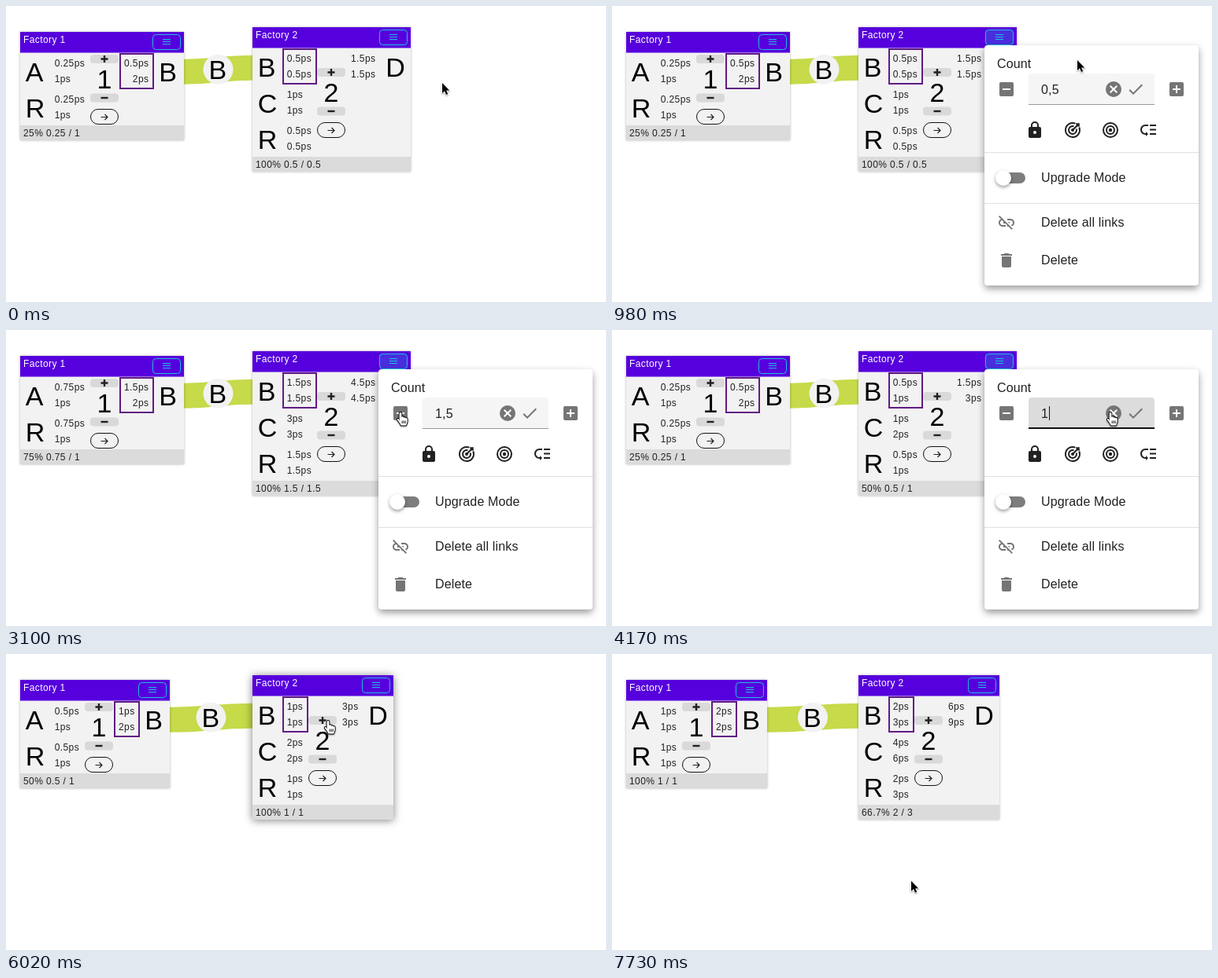
Write an HTML page with a canvas that moves like this. It is 762x377 px and loops after 7.97 s.

```html
<!DOCTYPE html>
<html lang="en">
<head>
<meta charset="utf-8">
<title>Factory planner</title>
<style>
html, body { margin: 0; width: 100%; height: 100%; overflow: hidden; background: #fff; }
canvas { display: block; }
</style>
</head>
<body>
<canvas id="stage" width="762" height="377"></canvas>
<script>
const ctx = document.getElementById('stage').getContext('2d');
const LOOP = 7970, STEP = 80;
const FONT = '"Liberation Sans", Arial, sans-serif';
const GREY = '#757575', INK = '#212121';

// Time, wanted count of factory 2, rate supplied by factory 1
const rates = [
  [0, .5, .5], [1870, 1.5, .5], [2120, 1.5, 1.5], [3360, .5, 1.5], [3600, .5, .5],
  [4170, 1, .5], [4330, 1, 1], [6190, 2, 1], [6430, 2, 2], [7010, 3, 2]
];

// Pointer moves: start, end, x, y, hand shown on arrival
const moves = [
  [0, 0, 554, 98, 0], [90, 330, 491, 40, 1], [820, 980, 591, 69, 0], [1060, 1300, 636, 118, 0],
  [1380, 1460, 672, 202, 0], [1540, 1620, 719, 109, 1], [2460, 3100, 501, 105, 1],
  [3440, 3520, 580, 214, 0], [3600, 3680, 633, 105, 1], [4410, 5050, 407, 242, 0],
  [5460, 5940, 409, 85, 1], [7490, 7730, 380, 289, 0]
];

const icons = {
  lock: 'M12 17a2 2 0 0 0 0-4 2 2 0 0 0 0 4m6-9a2 2 0 0 1 2 2v10a2 2 0 0 1-2 2H6a2 2 0 0 1-2-2V10a2 2 0 0 1 2-2h1V6a5 5 0 0 1 10 0v2h1m-6-5a3 3 0 0 0-3 3v2h6V6a3 3 0 0 0-3-3z',
  order: 'M14 5h8v2h-8zm0 5.5h8v2h-8zm0 5.5h8v2h-8zM2 11.5C2 15.08 4.92 18 8.5 18H9v2l3-3-3-3v2h-.5C6.02 16 4 13.98 4 11.5S6.02 7 8.5 7H12V5H8.5C4.92 5 2 7.92 2 11.5z',
  check: 'M21 7 9 19l-5.5-5.5 1.41-1.41L9 16.17 19.59 5.59z',
  unlink: 'M17 7h-4v1.9h4c1.71 0 3.1 1.39 3.1 3.1 0 1.43-.98 2.63-2.31 2.98l1.46 1.46C20.88 15.61 22 13.95 22 12c0-2.76-2.24-5-5-5zm-1 4h-2.19l2 2H16zM2 4.27l3.11 3.11A5 5 0 0 0 2 12c0 2.76 2.24 5 5 5h4v-1.9H7c-1.71 0-3.1-1.39-3.1-3.1 0-1.59 1.21-2.9 2.76-3.07L8.73 11H8v2h2.73L13 15.27V17h1.73l4.01 4L20 19.74 3.27 3z',
  trash: 'M19 4h-3.5l-1-1h-5l-1 1H5v2h14zM6 19a2 2 0 0 0 2 2h8a2 2 0 0 0 2-2V7H6z'
};
const arrowPath = new Path2D('M0 0V13L3 10.3 5 15 7.2 14 5.2 9.4H9.2Z');
const handPath = new Path2D('M-1.4 11V1.4a1.4 1.4 0 0 1 2.8 0V6.5a1.3 1.3 0 0 1 2.6 0V7a1.3 1.3 0 0 1 2.5.2V8a1.1 1.1 0 0 1 2.2.2V11.5c0 2-1.2 3-1.4 5H.6c-.5-2-3-4.5-4.6-7-.8-1.4.9-2.2 1.8-1z');

const clamp = v => Math.max(0, Math.min(1, v));
const last = (list, t) => list.reduce((found, row, i) => row[0] <= t ? i : found, 0);
const ps = v => +v.toFixed(2) + 'ps';

function setFont(size, spacing) {
  ctx.font = `${size}px ${FONT}`;
  ctx.letterSpacing = spacing + 'px';
}
function text(s, x, y, size, color = INK, align = 'left') {
  setFont(size, { 12: .4, 16: .15, 34: .25 }[size]);
  ctx.fillStyle = color;
  ctx.textAlign = align;
  ctx.fillText(s, x, y);
}
function rect(x, y, w, h, color, r = 0) {
  ctx.fillStyle = color;
  ctx.beginPath();
  ctx.roundRect(x, y, w, h, r);
  ctx.fill();
}
function outline(x, y, w, h, color, width, r = 0) {
  ctx.strokeStyle = color;
  ctx.lineWidth = width;
  ctx.beginPath();
  ctx.roundRect(x, y, w, h, r);
  ctx.stroke();
}
function dot(x, y, r, color) {
  rect(x - r, y - r, 2 * r, 2 * r, color, r);
}
function stroke(d, x, y, color, width) {
  ctx.save();
  ctx.translate(x, y);
  ctx.strokeStyle = color;
  ctx.lineWidth = width;
  ctx.stroke(new Path2D(d));
  ctx.restore();
}
function icon(name, x, y, color) {
  ctx.save();
  ctx.translate(x - 12, y - 12);
  ctx.fillStyle = color;
  ctx.fill(new Path2D(icons[name]), 'evenodd');
  ctx.restore();
}
function shadow(blur, dy, alpha, draw) {
  ctx.save();
  ctx.shadowColor = `rgba(0,0,0,${alpha})`;
  ctx.shadowBlur = blur;
  ctx.shadowOffsetY = dy;
  draw();
  ctx.restore();
}

// Column positions follow from the widest rate in each column
function layout(card) {
  setFont(12, .4);
  const widest = rows => Math.max(...rows.flatMap(r => [r[1], r[2]]).map(v => ctx.measureText(ps(v)).width));
  card.rateX = card.x + 43.7;
  card.inW = widest(card.inputs);
  card.midX = Math.round(card.rateX + card.inW + 7);
  card.outW = widest([card.output]);
  card.outX = card.midX + 43;
  card.w = Math.round(card.outX + card.outW + 44.5) - card.x;
  return card;
}

function drawCard(c) {
  const { x, y, w, midX } = c;
  const rows = c.inputs.length, foot = y + 27 + rows * 46, mid = y + 27 + rows * 23;
  shadow(c.hover ? 10 : 3, c.hover ? 1 : 0, c.hover ? .5 : .3, () => rect(x, y, w, foot + 19 - y, '#f2f2f2'));
  rect(x, y, w, 26.5, '#5600dd');
  rect(x, foot, w, 19, '#dbdbdb');
  text(c.title, x + 4, y + 14, 12, '#fff');
  if (c.active) rect(x + w - 40, y + 3, 36, 20, 'rgba(30,190,225,.24)', 4);
  outline(x + w - 39.5, y + 3.5, 35, 19, '#1cbfe0', 1, 4);
  stroke('M-5-3.5H5M-5-.5H5M-5 2.5H5', x + w - 22, y + 13, '#1cbfe0', 1);

  c.inputs.forEach(([name, now, max], i) => {
    const top = y + 27 + i * 46;
    text(name, x + 6.8, top + 36, 34, '#000');
    text(ps(now), c.rateX, top + 17, 12);
    text(ps(max), c.rateX, top + 37, 12);
  });

  for (const dy of [-38.5, 11]) rect(midX, mid + dy - 5.5, 36, 11, '#d9d9d9', 4);
  stroke('M-4.5 0H4.5M0-4.5V4.5', midX + 18, mid - 38.5, INK, 2.4);
  stroke('M-4.5 0H4.5', midX + 18, mid + 11, INK, 2.4);
  text(c.id, midX + 18, mid - 1, 34, '#000', 'center');
  outline(midX + .5, mid + 25.5, 35, 19, '#111', 1, 9.5);
  stroke('M-4.5 0H4M.5-3.5 4 0 .5 3.5', midX + 18, mid + 35.5, INK, 1.2);

  const [name, now, max] = c.output, right = c.outX + c.outW;
  text(ps(now), right, y + 44, 12, INK, 'right');
  text(ps(max), right, y + 64, 12, INK, 'right');
  text(name, right + 12.8, y + 63, 34, '#000');
  const [boxX, boxW] = c.boxed === 'out' ? [c.outX - 6, c.outW + 12] : [c.rateX - 6, c.inW + 12];
  outline(Math.round(boxX) + 1, y + 28, Math.ceil(boxW) - 2, 44, '#611b83', 2);
  text(c.status, x + 4, foot + 14, 12);
}

function drawLink(from, to) {
  const x1 = from.x + from.w, x2 = to.x, mid = (x1 + x2) / 2;
  stroke(`M${x1} 83.7C${mid} 83.7 ${mid} 78.7 ${x2} 78.7`, 0, 0, '#c6da4a', 32);
  dot(mid, 80.8, 19, '#f2f2f2');
  text('B', mid - .5, 92.5, 34, '#000', 'center');
}

function drawMenu(t, value, hovered) {
  const alpha = t < 3000 ? clamp((t - 580) / 240) : 1 - clamp((t - 5260) / 240);
  if (!alpha) return;
  ctx.save();
  ctx.globalAlpha = alpha;
  shadow(10, 4, .4, () => rect(473, 50, 272, 306, '#fff', 4));
  text('Count', 489, 79, 16);
  for (const x of [501, 717]) {
    rect(x - 9, 97, 18, 18, GREY, 2);
    stroke(x < 600 ? 'M-5 0H5' : 'M-5 0H5M0-5V5', x, 106, '#fff', 2);
  }

  const focused = t >= 3850 && t < 5250;
  rect(529, 86, 160, 40, focused ? '#dcdcdc' : '#f5f5f5', [4, 4, 0, 0]);
  rect(529, 125, 160, 1, hovered ? '#444' : '#999');
  const line = 160 * clamp(t < 5130 ? (t - 3770) / 200 : 1 - (t - 5130) / 115);
  if (line) rect(609 - line / 2, 124, line, 2, '#111');
  text(value, 545, 112, 16);
  if (t >= 3850 && t < 4700) rect(546 + ctx.measureText(value).width, 97, 1, 18, '#111');
  dot(637, 106, 10, GREY);
  stroke('M-4.3-4.3 4.3 4.3M4.3-4.3-4.3 4.3', 637, 106, '#fff', 2);
  icon('check', 665, 106, GREY);

  icon('lock', 537, 158, INK);
  stroke('M3.5-8.3A9 9 0 1 0 8.3-3.5M1.5-4.8A5 5 0 1 0 4.8-1.5M0 0 6-6M5.5-9V-5.5H9M5.5-5.5 8.5-8.5', 585, 158, INK, 2);
  dot(585, 158, 2, INK);
  for (const r of [9, 5]) outline(633 - r, 158 - r, 2 * r, 2 * r, INK, 2, r);
  dot(633, 158, 2.2, INK);
  icon('order', 681, 158, INK);

  for (const y of [186, 251]) rect(473, y, 272, 1, '#e0e0e0');
  rect(489, 212, 36, 14, '#7d7d7d', 7);
  shadow(4, 2, .4, () => dot(497, 219, 10, '#fff'));
  text('Upgrade Mode', 545, 224, 16);
  icon('unlink', 501, 276, GREY);
  text('Delete all links', 545, 281, 16);
  icon('trash', 501, 324, GREY);
  text('Delete', 545, 329, 16);
  ctx.restore();
}

function pointerAt(t) {
  const i = last(moves, t), [start, end, x, y, hand] = moves[i];
  if (!i) return { x, y, hand };
  const steps = Math.round((end - start) / STEP) + 1;
  const p = clamp((Math.floor((t - start) / STEP) + 1) / steps);
  const k = p * p * (3 - 2 * p), [, , fromX, fromY] = moves[i - 1];
  return { x: fromX + (x - fromX) * k, y: fromY + (y - fromY) * k, hand: p === 1 && hand };
}

function drawPointer({ x, y, hand }) {
  ctx.save();
  ctx.translate(x, y);
  ctx.lineJoin = 'round';
  const path = hand ? handPath : arrowPath;
  ctx.strokeStyle = hand ? '#000' : '#fff';
  ctx.lineWidth = hand ? 1.8 : 1.6;
  shadow(2, 1, .4, () => ctx.stroke(path));
  ctx.fillStyle = hand ? '#fff' : '#000';
  ctx.fill(path);
  if (hand) stroke('M2.2 10.5V14M4.2 10.5V14M6.2 10.5V14', 0, 0, '#000', .9);
  ctx.restore();
}

function draw(t) {
  const [, want, supply] = rates[last(rates, t)], half = supply / 2;
  const pointer = pointerAt(t);
  const percent = v => +(v * 100).toFixed(1) + '% ';
  const one = layout({
    id: '1', title: 'Factory 1', x: 18, y: 33, boxed: 'out',
    inputs: [['A', half, 1], ['R', half, 1]], output: ['B', supply, 2],
    status: percent(half) + half + ' / 1'
  });
  const two = layout({
    id: '2', title: 'Factory 2', x: 313, y: 27, boxed: 'in',
    inputs: [['B', supply, want], ['C', 2 * supply, 2 * want], ['R', supply, want]],
    output: ['D', 3 * supply, 3 * want],
    status: percent(supply / want) + supply + ' / ' + want,
    active: t >= 330 && t < 5300
  });
  const inside = (x, y, w, h) => pointer.x > x && pointer.x < x + w && pointer.y > y && pointer.y < y + h;
  two.hover = (t < 740 || t > 5500) && inside(two.x, two.y, two.w, 184);

  ctx.fillStyle = '#fff';
  ctx.fillRect(0, 0, 762, 377);
  drawLink(one, two);
  drawCard(one);
  drawCard(two);
  const value = t >= 3850 && t < 4170 ? '' : String(want).replace('.', ',');
  drawMenu(t, value, inside(529, 86, 160, 40));
  drawPointer(pointer);
}

const begin = performance.now();
function frame() {
  draw((performance.now() - begin) % LOOP);
  requestAnimationFrame(frame);
}
frame();
</script>
</body>
</html>
```
